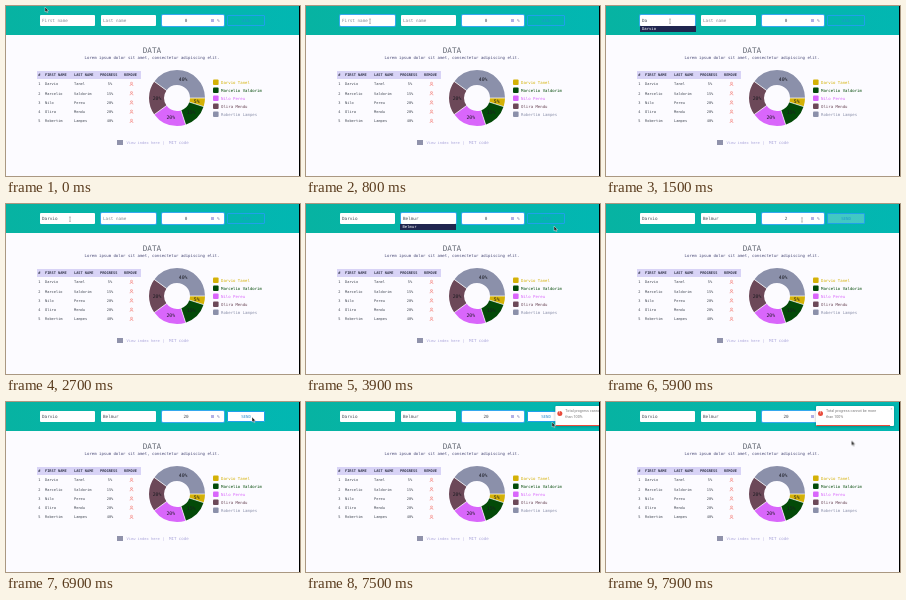
An HTML page that plays this animation: 294 px wide and 170 px high, repeating every 8 s.

```html
<!DOCTYPE html>
<html lang="en">
<head>
<meta charset="utf-8">
<title>Progress data</title>
<style>
html, body { margin: 0; width: 100%; height: 100%; overflow: hidden; }
body { position: relative; background: #fcfbff; font: 4.3px/10px "DejaVu Sans Mono", monospace; color: #444a55; }
svg { position: absolute; left: 0; top: 0; overflow: visible; }
header { position: absolute; width: 294px; height: 29px; background: linear-gradient(90deg, #07b3a2, #02b7b2); }
.edge { position: absolute; right: 0; top: 0; width: 1px; height: 100%; background: #000; }
.field, .send { position: absolute; top: 9px; height: 11px; box-sizing: border-box; border-radius: 1px; }
.field { width: 55px; background: #fff; }
.field > * { position: absolute; left: 2px; top: .5px; white-space: pre; }
.hint { color: #858b95; }
.typed { overflow: hidden; width: 0; }
#progress { left: 156px; width: 62px; box-shadow: 0 0 0 1px #35a9ee; }
#progress .value { left: 14px; width: 20px; text-align: center; }
#progress .unit { left: 55px; color: #7a78b0; }
#progress .spin { left: 49px; top: 4px; width: 3px; height: 3px; background: #b3b0e6; }
.list {
  position: absolute; top: 20px; width: 56px; height: 5.6px; padding-left: 2.5px; box-sizing: border-box;
  background: #20264f; color: #fff; font-size: 3.9px; line-height: 5.4px; opacity: 0;
}
.send { left: 221px; width: 38px; border: 1px solid #1fa0ea; text-align: center; font-size: 4px; line-height: 9.2px; }
.toast {
  position: absolute; left: 210px; top: 4px; width: 78px; height: 20px; overflow: hidden;
  background: #fff; border-radius: 1px; box-shadow: 0 .5px 3px #0004;
  font: 3.7px/5.8px Roboto, sans-serif; color: #777;
}
.toast p { position: absolute; margin: 0; left: 10px; top: 3.4px; white-space: pre; }
.toast b { position: absolute; left: 2px; top: 4.5px; width: 5px; height: 5px; border-radius: 50%; background: #e94b3c; color: #fff; text-align: center; line-height: 5px; }
.toast i { position: absolute; right: 1.5px; top: .5px; font-style: normal; color: #aaa; }
.toast u { position: absolute; left: 0; bottom: 0; width: 100%; height: 1.4px; background: #e94b3c; transform-origin: left; }

.typed, .list, .hint, .send, .toast, .toast u, #cursor, #arrow, #beam, .field, .value { animation: 8s step-end infinite; }
.first .typed { animation-name: type1; }
.first .hint { animation-name: hint1; }
.last .typed { animation-name: type2; }
.last .hint { animation-name: hint2; }
.field.first { left: 34px; animation-name: focus1; }
.field.last { left: 95px; animation-name: focus2; }
.l1 { left: 33.5px; animation-name: list1; }
.l2 { left: 94px; animation-name: list2; }
.v0 { animation-name: v0; }
.v1 { animation-name: v1; }
.v2 { animation-name: v2; }
.send { animation-name: enable; animation-timing-function: linear; }
.toast { animation-name: slide; animation-timing-function: ease-out; }
.toast u { animation-name: drain; animation-timing-function: linear; }
#cursor { animation-name: move; animation-timing-function: ease-in-out; }
#arrow { animation-name: arrow; }
#beam { animation-name: beam; }

@keyframes type1 { 0% { width: 0 } 16.25% { width: 1ch } 18.75% { width: 2ch } 20% { width: 3ch } 21.25% { width: 4ch } 23.75% { width: 5ch } 25%, 100% { width: 6ch } }
@keyframes type2 { 0% { width: 0 } 35% { width: 1ch } 36.25% { width: 2ch } 38.75% { width: 3ch } 40% { width: 4ch } 41.25% { width: 5ch } 43.75%, 100% { width: 6ch } }
@keyframes hint1 { 0% { opacity: 1 } 16.25%, 100% { opacity: 0 } }
@keyframes hint2 { 0% { opacity: 1 } 35%, 100% { opacity: 0 } }
@keyframes list1 { 0% { opacity: 0 } 16.25% { opacity: 1 } 27.5%, 100% { opacity: 0 } }
@keyframes list2 { 0% { opacity: 0 } 35% { opacity: 1 } 63.75%, 100% { opacity: 0 } }
@keyframes focus1 { 0% { box-shadow: none } 7.5% { box-shadow: 0 0 0 1px #35a9ee } 28.75%, 100% { box-shadow: none } }
@keyframes focus2 { 0% { box-shadow: none } 28.75% { box-shadow: 0 0 0 1px #35a9ee } 63.75%, 100% { box-shadow: none } }
@keyframes v0 { 0% { opacity: 1 } 72.5%, 100% { opacity: 0 } }
@keyframes v1 { 0% { opacity: 0 } 72.5% { opacity: 1 } 75%, 100% { opacity: 0 } }
@keyframes v2 { 0% { opacity: 0 } 75%, 100% { opacity: 1 } }
@keyframes enable { 0%, 72.5% { background: #fff0; color: #1c9bcb } 77.5%, 100% { background: #fff; color: #2c8fd0 } }
@keyframes slide { 0%, 92.4% { transform: translateX(90px) } 96% { transform: translateX(-3px) } 97.3% { transform: translateX(1px) } 98.5%, 100% { transform: none } }
@keyframes drain { 0%, 92.5% { transform: none } 100% { transform: scaleX(.94) } }
@keyframes move {
  0%, 1.2% { transform: translate(39px, 1px) }
  7.5%, 44.5% { transform: translate(64px, 13px) }
  47.5% { transform: translate(248px, 28px) }
  48.75% { transform: translate(248px, 22px) }
  53.75%, 55.5% { transform: translate(241px, 20px) }
  61.25%, 80.5% { transform: translate(196px, 13.5px) }
  86.25%, 92% { transform: translate(246px, 15px) }
  97.5%, 100% { transform: translate(245.5px, 38.5px) }
}
@keyframes arrow { 0% { opacity: 1 } 6.25% { opacity: 0 } 45% { opacity: 1 } 60% { opacity: 0 } 82.5%, 100% { opacity: 1 } }
@keyframes beam { 0% { opacity: 0 } 6.25% { opacity: 1 } 45% { opacity: 0 } 60% { opacity: 1 } 82.5%, 100% { opacity: 0 } }
</style>
</head>
<body>
<header></header>
<div class="field first"><span class="hint">First name</span><span class="typed">Darvio</span></div>
<div class="field last"><span class="hint">Last name</span><span class="typed">Belmur</span></div>
<div class="field" id="progress">
  <span class="value v0">0</span><span class="value v1">2</span><span class="value v2">20</span>
  <span class="spin"></span><span class="unit">%</span>
</div>
<div class="send">SEND</div>

<svg id="page" width="294" height="170" viewBox="0 0 294 170">
  <rect x="31" y="65" width="104" height="8" fill="#d8d3f6"/>
  <rect x="111" y="134" width="6" height="5" fill="#9092ab"/>
</svg>

<div class="list l1">Darvio</div>
<div class="list l2">Belmur</div>
<div class="toast"><b>!</b><p>Total progress cannot be more
than 100%</p><i>×</i><u></u></div>

<svg width="294" height="170" viewBox="0 0 294 170">
  <g id="cursor">
    <path id="arrow" d="M0 0V5L1.2 4L2 5.8L2.9 5.4L2.1 3.7H3.7Z" fill="#222" stroke="#fff" stroke-width=".4"/>
    <path id="beam" d="M-.8 0H.8M0 0V4.4M-.8 4.4H.8" fill="none" stroke="#777" stroke-width=".5"/>
  </g>
</svg>
<div class="edge"></div>

<script>
const page = document.getElementById('page');
const people = [
  ['Darvio', 'Tanel', 5, '#d4b106'],
  ['Marcelio', 'Valdorim', 15, '#034a08'],
  ['Nilo', 'Pereu', 20, '#d966fb'],
  ['Olira', 'Mendu', 20, '#6c4858'],
  ['Robertim', 'Lampes', 40, '#8b90aa'],
];

function add(tag, attrs, content = '') {
  const el = document.createElementNS('http://www.w3.org/2000/svg', tag);
  for (const key in attrs) el.setAttribute(key, attrs[key]);
  el.textContent = content;
  page.append(el);
}

function label(content, x, y, size, fill = '#444a55', anchor = 'start', weight = 400) {
  add('text', { x, y, fill, 'font-size': size, 'text-anchor': anchor, 'font-weight': weight }, content);
}

label('DATA', 146, 47, 7.7, '#666b76', 'middle');
label('Lorem ipsum dolor sit amet, consectetur adipiscing elit.', 146, 53, 4, '#4b4c78', 'middle');
[['#', 32.3], ['FIRST NAME', 39], ['LAST NAME', 68], ['PROGRESS', 94], ['REMOVE', 118]]
  .forEach(([name, x]) => label(name, x, 70.3, 3.6, '#33364a', 'start', 700));

const cx = 171, cy = 92, inner = 13, outer = 28, mid = (inner + outer) / 2;
const at = (share, r) => {
  const a = share * Math.PI / 50;
  return [cx + r * Math.cos(a), cy + r * Math.sin(a)];
};

let start = 0;
const slices = [];
people.forEach(([first, last, share, color], i) => {
  const y = 79.4 + 9.25 * i;
  label(i + 1, 32.3, y, 3.65);
  label(first, 39, y, 3.65);
  label(last, 68, y, 3.65);
  label(share + '%', 104, y, 3.65, '#444a55', 'middle');
  add('path', {
    d: `M125.5 ${y - 3.1}a.9 .9 0 1 0 .01 0M124 ${y + .6}q0-1.6 1.5-1.6t1.5 1.6`,
    fill: 'none', stroke: '#f2665c', 'stroke-width': .5,
  });

  add('circle', {
    cx, cy, r: mid, fill: 'none', stroke: color, 'stroke-width': outer - inner,
    pathLength: 100, 'stroke-dasharray': `${share} ${100 - share}`, 'stroke-dashoffset': -start,
  });
  slices.push([start, share]);
  start += share;

  const ly = 76 + 8 * i;
  add('rect', { x: 207, y: ly - 2.5, width: 5.6, height: 5.6, rx: 1, fill: color });
  label(`${first} ${last}`, 215, ly + 1.6, 4, color);
});

slices.forEach(([from, share]) => {
  const [x1, y1] = at(from, inner - .5), [x2, y2] = at(from, outer + .5);
  add('line', { x1, y1, x2, y2, stroke: '#fff', 'stroke-width': .7 });
  const [x, y] = at(from + share / 2, mid - .5);
  label(share + '%', x, y + 1.6, 4.8, '#1b1b22', 'middle');
});

label('View index here', 120.5, 137.6, 3.7, '#aaa5da');
label('|', 156.5, 137.6, 3.7, '#aaa5da');
label('MIT code', 163, 137.6, 4.1, '#aaa5da');
</script>
</body>
</html>
```
